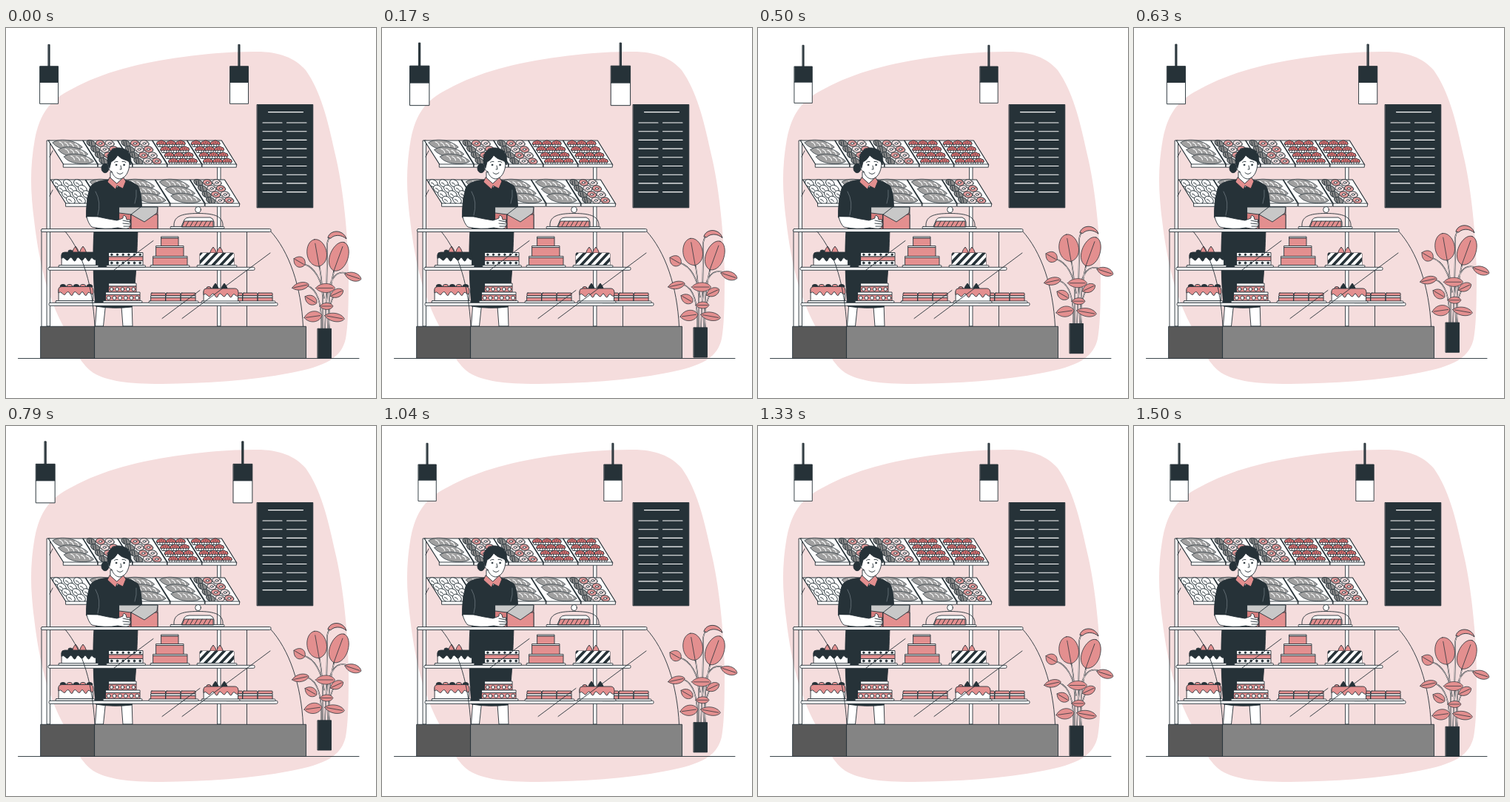
These frames come from a looping animation (500 px wide and 500 px high, 1.54 s). An HTML page:

```html
<!DOCTYPE html>
<html lang="en">
<head>
<meta charset="utf-8">
<title>Bakery</title>
<style>
html, body { margin: 0; width: 100%; height: 100%; overflow: hidden; background: #fff; }
svg { display: block; width: 100vw; height: 100vh; }
</style>
</head>
<body>
<svg id="stage" viewBox="0 0 500 500" stroke="#263238" stroke-width=".9" stroke-linejoin="round" stroke-linecap="round"></svg>
<script>
const DARK = '#263238', PINK = '#e38f8f', WHITE = '#fff', GREY = '#a0a0a0';
const LOOP = 1540, PHASE = 36;

// Shape helpers, all returning SVG markup
const path = (d, fill = 'none', extra = '') => `<path d="${d}" fill="${fill}" ${extra}/>`;
const rect = (x, y, w, h, fill = WHITE, r = 0) =>
  `<rect x="${x}" y="${y}" width="${w}" height="${h}" rx="${r}" fill="${fill}"/>`;
const oval = (x, y, rx, ry, fill = WHITE, turn = 0) =>
  `<ellipse cx="${x}" cy="${y}" rx="${rx}" ry="${ry}" fill="${fill}" transform="rotate(${turn} ${x} ${y})"/>`;
const group = (content, attrs = '') => `<g ${attrs}>${content}</g>`;
const at = (x, y, content) => group(content, `transform="translate(${x} ${y})"`);
const times = (n, draw) => Array.from({ length: n }, (_, i) => draw(i)).join('');

function lamp(x) {
  return rect(x + 11, 23.3, 1.8, 29, DARK) + rect(x, 73, 24, 28.4) + rect(x, 52, 24, 21, DARK);
}

function board() {
  const rows = times(9, i => `M347 ${128 + i * 11.7}h26M379.5 ${128 + i * 11.7}h26.5`);
  return rect(339.4, 103.5, 75.4, 139.3, DARK) +
    path('M354.5 113.6h47' + rows, 'none', 'stroke="#fff" stroke-width="1.1"');
}

// Goods lying on one slanted tray
const goods = {
  loaves: () => times(3, i => {
    const x = 26 + i * 7.7, y = 6 + i * 9.5;
    return path(`M${x - 20} ${y - 3}C${x - 12} ${y - 10} ${x + 10} ${y - 7} ${x + 20} ${y + 3}
      C${x + 14} ${y + 9} ${x - 14} ${y + 8} ${x - 20} ${y - 3}Z`, GREY, 'stroke-width=".7"') +
      path(times(4, k => `M${x - 11 + k * 7} ${y - 4 + k * .8}q4 1 5 5`), 'none', 'stroke="#fff" stroke-width="1.1"');
  }),
  donuts: () => times(4, r => times(3, c => {
    const x = 11 + c * 12.5 + r * 5.6, y = 4 + r * 8;
    if (!c) return oval(x, y, 6.5, 4, '#8a8a8a', 25) + path(`M${x - 3} ${y - 3}l1 6m2-6l1 6`);
    return oval(x, y, 6.2, 4.2, c + r & 1 ? '#e79c9c' : '#f7e3e3', 10) + oval(x, y, 2.2, 1.3) +
      path(`M${x - 4} ${y + 1}l1 1m6-4l1 1`);
  })),
  tarts: () => times(4, r => times(3, c => {
    const x = 12 + c * 13 + r * 5.4, y = 4 + r * 8;
    return path(`M${x - 6} ${y}h12l-2 4.5h-8z`, WHITE) + path(`M${x - 2} ${y + 1}v3m4-3v3`) +
      path(`M${x - 6.5} ${y + 1}q0-4 3.5-4q3-2.6 6 0q3.5 0 3.5 4q-2 1.5-3.5 0q-1.5 1.5-3 0q-1.5 1.5-3 0q-2 1.5-3.5 0z`, '#db6f6f') +
      path(`M${x - 3} ${y - 1}l1 1m2-2v1m3 0l-1 1`);
  })),
  twists: () => times(3, c => times(4, r => {
    const x = 9 + c * 14 + r * 6, y = 5 + r * 7.5;
    return oval(x, y, 6.5, 4.6, WHITE, 35) + path(`M${x - 3} ${y - 1}q3 0 4 3`);
  }))
};

function tray(x, y, kind) {
  return at(x, y, path('M0 0H46.5L67 33H21Z', WHITE, 'stroke-width="1.2"') +
    goods[kind]() + rect(20.5, 32, 46, 4.2));
}

function shelves() {
  const top = ['loaves', 'donuts', 'donuts', 'tarts', 'tarts'];
  const low = ['twists', 'loaves', 'loaves', 'loaves', 'donuts'];
  return rect(55.5, 152, 4, 251) + rect(286, 180, 4, 223) +
    path('M59 174l4-8M59 227l4-8') +
    top.map((kind, i) => tray(57.2 + i * 46.9, 152, kind)).join('') +
    low.map((kind, i) => tray(60.5 + i * 47.1, 205, kind)).join('');
}

function baker() {
  return path('M123 370L120.5 403H131.5L135 370ZM155.5 370L158 403H171L170 370Z', WHITE) +
    path('M119 274H178C177 300 176 345 170 377Q145 380 121 376C118 345 117 300 119 274Z', DARK) +
    path('M138 205C124 207 116 209 113 217Q108 235 108.5 256L121 259L122 275H178L183.5 242Q183 220 178 213Q170 207 160 205Z', DARK) +
    path('M141 195V207L150 216L159 205L158 197Z', WHITE) +
    path('M140 202L137 208L148 218L150 213L158 217L162 207L158.5 202L150 210Z', PINK) +
    oval(134, 189.5, 5, 6.2, DARK) +
    path('M140 181C137 188 139 193 143 194C145 201 150 204 154 204C161 203 167 195 167 181L152 169Z', WHITE) +
    path('M138 185C134 170 143 161 153 162C165 163 171 171 168 185Q166 179 163 179Q155 177 151 172Q147 179 142 181L140 189Z', DARK) +
    path('M146.5 181.5q2-2 4.5-1m6 0q3-1 5 1M155 186l1 5h-2M150 195.5q4 4 8 0') +
    oval(149, 185, .8, 1, DARK) + oval(159.5, 185, .8, 1, DARK) +
    path('M121 221q8 14 3 32M176 219q1 9-2 18', 'none', 'stroke="#77838a" stroke-width=".7"');
}

function box() {
  return path('M153 242H205V271.5H153Z', '#d67e7e') + rect(169, 252, 36, 19.5, PINK) +
    path('M153 242H205L204 250L187 262L169 252L153 250Z', '#c8c8c8') + path('M169 252L182 242M169 252V271') +
    path('M109 255Q111 264 116 269Q134 273 151 270L158 271Q168 272 167 268L169 265L167 262L168 259L163 259L162 255Q158 251 158 257L150 260Q137 258 124 255Z', WHITE) +
    path('M158 260l9 2m-9 2l10 1m-9 3l8 0');
}

function shelf(x, y, w) { return rect(x, y, w, 4, WHITE, 1.5); }
function plate(x, y, w) { return rect(x, y, w, 2.6, WHITE, 1.2); }

const cone = (x, y, fill) => path(`M${x - 4.5} ${y}Q${x - 3} ${y - 5} ${x} ${y - 8}Q${x + 3} ${y - 5} ${x + 4.5} ${y}Z`, fill);

function dripCake(x, y, icing) {
  return rect(x, y + 4, 46, 15) +
    path(`M${x - .5} ${y + 8}V${y + 3}Q${x} ${y} ${x + 4} ${y}H${x + 42}Q${x + 47} ${y} ${x + 46.5} ${y + 8}
      q-1 4-4 1q-2-3-4 0q-2 6-5 0q-2-4-4 0q-2 4-5 0q-3-4-5 0q-2 6-5 0q-2-4-5 0q-2 4-5 0q-3-3-4.5-1z`, icing);
}

function dottedBand(x, y, w, h, fill, dot, n, r) {
  return rect(x, y, w, h, fill) + times(n, i => oval(x + w * (i + .5) / n, y + h / 2, r, r, dot));
}

// A pink tier with a thin white rim on top
function tier(x, y, w, h) {
  return rect(x, y, w, 2) + rect(x, y + 2, w, h - 2, PINK);
}

function slice(x) {
  return rect(x, 358, 19.5, 4, PINK, 1) + rect(x, 362, 19.5, 2.5) + rect(x, 364.5, 19.5, 5.5, PINK);
}

function stripedCake(x, y) {
  const stripes = times(6, i => `M${x + i * 10.5 - 12} ${y + 17}l16-17h5.5l-16 17z`);
  return `<clipPath id="cake"><rect x="${x}" y="${y}" width="46" height="17" rx="1.5"/></clipPath>` +
    cone(x + 18, y, PINK) + cone(x + 27, y, PINK) + rect(x, y, 46, 17, DARK, 1.5) +
    path(stripes, WHITE, 'clip-path="url(#cake)" stroke="none"');
}

function cakes() {
  const dome = path('M227 268C226 255 236 250.5 259.5 250.5S294 255 293 268') + oval(259.5, 245.5, 3.8, 4) +
    plate(222, 268.4, 73) +
    path('M237 268.4L241 259Q243 256 248 256H276Q280 257 281 262V268.4Z', WHITE) +
    path('M238 268.4L241 261H280V268.4Z' + times(6, i => `M${243 + i * 6} 268l4-7`), PINK);
  const upper = cone(94, 303, PINK) + cone(104, 303, PINK) + oval(87, 302, 3, 2, DARK) + dripCake(75.5, 303, DARK) + plate(71, 320.6, 54) +
    dottedBand(139, 303.5, 46, 5.5, WHITE, DARK, 6, 1.2) + rect(139, 309, 46, 5.5, PINK) +
    dottedBand(139, 314.5, 46, 6, WHITE, DARK, 6, 1.4) + plate(135.5, 320.6, 53) +
    tier(210, 282, 23, 12.5) + tier(203, 294.5, 37, 14) + tier(199, 308.5, 46, 12) + plate(195, 320.6, 53) +
    stripedCake(262, 304) + plate(258, 320.6, 54);
  const balls = times(5, i => oval(77 + i * 9, 349, 3.8, 2.6, i & 1 ? PINK : DARK));
  const lower = balls + dripCake(71.5, 349.5, PINK) + plate(67, 368.6, 53) +
    rect(139, 345, 37, 4) + dottedBand(139, 349, 37, 8, PINK, WHITE, 5, 2.3) +
    rect(135, 357, 46, 3.5) + dottedBand(135, 360.5, 46, 8.5, PINK, WHITE, 6, 2.5) + plate(131, 368.6, 53) +
    times(3, i => slice(196 + i * 20.3)) + plate(193, 369, 67) +
    times(3, i => slice(300 + i * 20.3)) + plate(297, 369, 67) +
    cone(283, 353, DARK) + cone(295, 353, DARK) + oval(274, 351.5, 3, 2, PINK) + dripCake(267.5, 352, PINK) + plate(264, 369, 52);
  return dome + upper + lower;
}

function counter() {
  return path('M48 274V403M325.5 275V403M357 274C383 302 399 350 401.5 403') +
    shelf(57, 323.3, 279) + shelf(58, 371.3, 309) + shelf(47.5, 271.5, 310.5) + cakes() +
    path('M80 275C105 305 117 350 120 403M199 287.5L146 327M262 354.5L211 392.5M357 304L238 392.5') +
    rect(47, 403.3, 73, 43.2, '#595959') + rect(120, 403.3, 285.5, 43.2, '#848484');
}

function leaf(x, y, rx, ry, turn) {
  const wide = rx > ry;
  const vein = wide ? `M${-rx * .8} 0H${rx * .8}` : `M0 ${-ry * .7}V${ry * 1.1}`;
  const blade = wide
    ? `M${-rx} 0C${-rx * .5} ${-ry * 1.4} ${rx * .7} ${-ry * 1.3} ${rx} 0C${rx * .7} ${ry * 1.3} ${-rx * .5} ${ry * 1.4} ${-rx} 0Z`
    : `M0 ${-ry}C${rx * 1.1} ${-ry} ${rx * 1.5} ${ry * .8} 0 ${ry}C${-rx * 1.5} ${ry * .8} ${-rx * 1.1} ${-ry} 0 ${-ry}Z`;
  return group(path(blade, PINK) + path(vein), `transform="translate(${x} ${y}) rotate(${turn})" stroke-width=".7"`);
}

function plant() {
  const stems = 'M428 406Q430 340 420 308M431 406Q434 350 434 292Q435 284 440 281M435 406Q436 340 449 312' +
    'M433 370Q438 326 459 331M430 365Q424 326 403 319M426 406Q428 356 407 348M437 406Q434 380 443 362';
  const leaves = [[420, 304, 13.5, 18.5, -10], [450, 309, 12.5, 20.5, 20], [469, 336, 11.5, 5.5, 18], [396.5, 316, 8.5, 7, 30],
    [398, 349, 11.5, 5, -12], [447, 358.5, 9.5, 5.5, -25], [412, 367.5, 9, 6, 30],
    [415, 390, 12, 7, -8], [444, 391, 13.5, 5.5, 10], [431.5, 351.5, 13, 6, 0], [433, 376, 9, 4.5, 0]];
  return path(stems, 'none', 'stroke-width="1.6"') + path(stems, 'none', 'stroke="#e9d9d9" stroke-width=".8"') +
    leaves.map(l => leaf(...l)).join('') +
    path('M435 283C438 272 456 272 460 285C453 279 444 279 439 284Z', PINK) +
    rect(421.3, 406.3, 18.2, 40.2, DARK);
}

const stage = document.getElementById('stage');
stage.innerHTML =
  path(`M335 32C300 32 270 35 240 39C180 47 130 60 90 82C58 98 46 116 39 150C32 190 33 220 38 260
    C45 320 57 365 78 404C88 425 98 452 118 466C136 477 165 481 210 481C270 480 330 477 385 466
    C432 457 453 446 459 420C463 400 463 360 463 330C462 280 456 215 444 167C435 125 425 85 405 57
    C390 39 365 31 335 32Z`, '#f5dddd', 'stroke="none"') +
  path('M16.5 446.5H477') + board() + group(lamp(49.3) + lamp(300.2), 'id="lamps"') +
  shelves() + baker() + box() + counter() + group(plant(), 'id="plant"');

const lamps = document.getElementById('lamps');
const pot = document.getElementById('plant');
const bump = (p, start, peak, end) =>
  Math.max(0, Math.min((p - start) / (peak - start), (end - p) / (end - peak)));

function frame() {
  const p = (performance.now() + PHASE) % LOOP / LOOP;
  const scale = 1 + .1 * (bump(p, 0, .1, .3) + bump(p, .4, .5, .6));
  const lift = -4.3 * (1 - Math.cos(2 * Math.PI * p));
  lamps.setAttribute('transform', `translate(186.7 62) scale(${scale}) translate(-186.7 -62)`);
  pot.setAttribute('transform', `translate(0 ${lift})`);
  requestAnimationFrame(frame);
}
frame();
</script>
</body>
</html>
```
